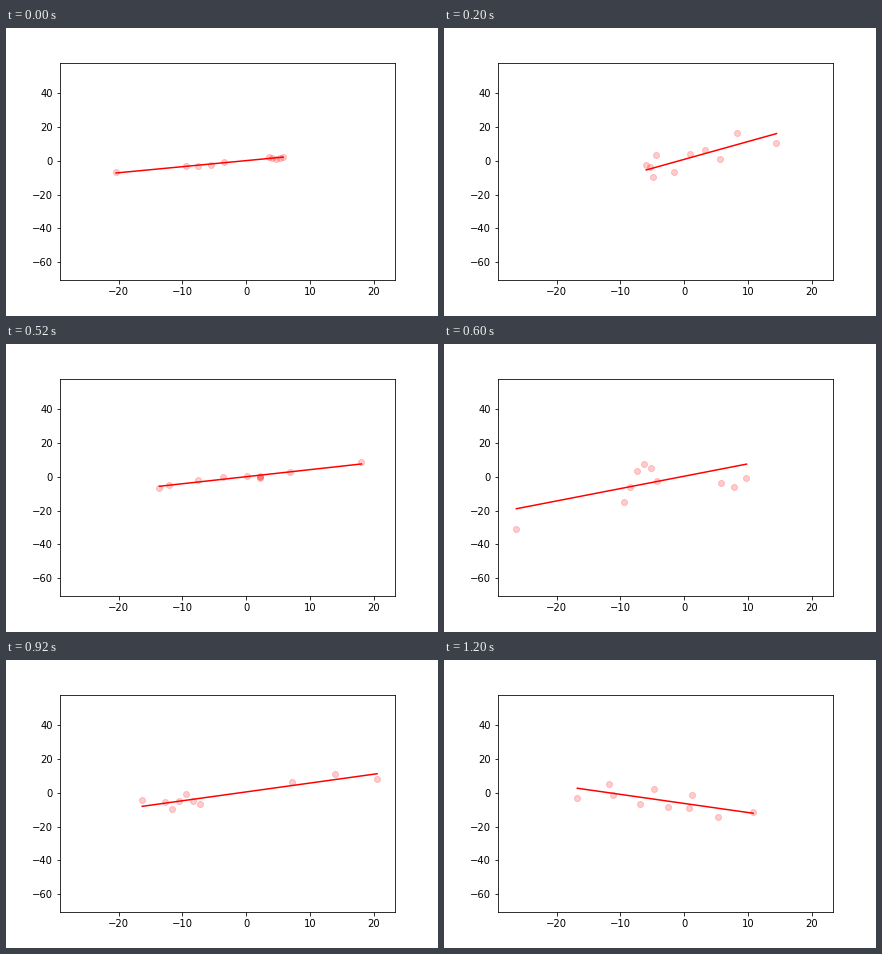
These frames come from a looping animation (432x288 px, 1400 ms). A matplotlib script:

```python
import matplotlib.pyplot as plt
import numpy as np
from matplotlib.animation import FuncAnimation

plt.rcParams["font.family"] = "DejaVu Sans"


def dataset(xs, slope, intercept, spread, period, peak):
    """Scatter dots around a straight trend with a wave-shaped residual."""
    trend = slope * xs + intercept
    turns = (np.arange(len(xs)) - peak) / period
    return xs, trend + spread * np.cos(2 * np.pi * turns), trend


# Each np.r_ lists lone dots and evenly spaced runs (start:stop:count)
DATASETS = [
    dataset(np.r_[-20.4, -9.5:-3.5:4j, 3.5:5.8:5j],
            0.359, 0.12, spread=0.6, period=5, peak=0),
    dataset(np.r_[-5.95:-4.4:4j, -1.55:5.65:4j, 8.3, 14.45],
            1.054, 0.87, spread=7, period=2.52, peak=0.45),
    dataset(np.r_[-13.6, -12.05, -7.5:0.15:3j, 2.1:2.2:3j, 6.9, 18.05],
            0.417, 0.07, spread=1.5, period=7, peak=2.7),
    dataset(np.r_[-26.3, -9.5:-4.2:6j, 5.8:9.75:3j],
            0.732, 0.36, spread=12, period=8, peak=4),
    dataset(np.r_[-16.3, -12.7:-7.2:6j, 7.2:20.5:3j],
            0.524, 0.54, spread=4, period=3.7, peak=0.2),
    dataset(np.r_[-14.9, -6.25:-4.55:3j, -1.85:2.5:4j, 10.2, 10.5],
            -3.795, -4.0, spread=20, period=2.8, peak=1.2),
    dataset(np.r_[-16.75, -11.75, -11.1, -6.9:-2.5:3j, 0.8, 1.25, 5.35, 10.8],
            -0.537, -6.3, spread=6, period=2.8, peak=4.05),
]

fig, ax = plt.subplots(figsize=(6, 4), dpi=72)
fig.subplots_adjust(left=0.125, right=0.9, bottom=0.125, top=0.88)
ax.set_xlim(-29.184, 23.276)
ax.set_ylim(-70.52, 58.13)

dots = ax.scatter([], [], color="red", alpha=0.2)
line, = ax.plot([], [], color="red", lw=1.5)


def update(i):
    xs, ys, trend = DATASETS[i]
    dots.set_offsets(np.column_stack([xs, ys]))
    line.set_data(xs, trend)
    return dots, line


anim = FuncAnimation(fig, update, frames=len(DATASETS), interval=200,
                     repeat=True, repeat_delay=0)
plt.show()
```
